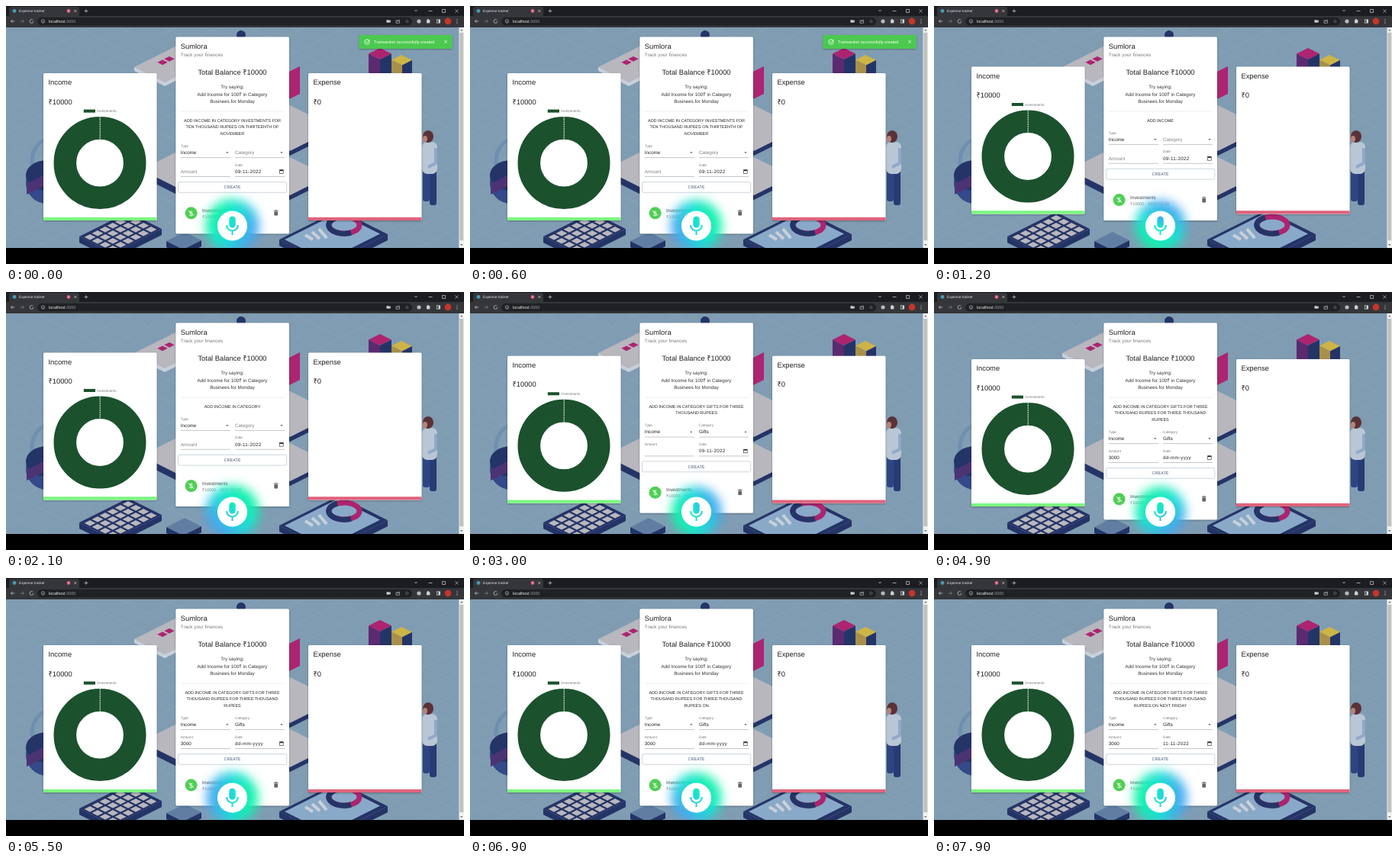
An HTML page for the animation above (8 s loop, 600 by 338 pixels).

```html
<!DOCTYPE html>
<html lang="en">
<head>
<meta charset="utf-8">
<title>Expense tracker</title>
<style>
html, body { margin: 0; width: 100%; height: 100%; overflow: hidden; background: #000; }
svg { display: block; width: 100%; height: 100%; font-family: "Liberation Sans", Arial, sans-serif; text-rendering: geometricPrecision; }
</style>
</head>
<body>
<svg id="stage" viewBox="0 0 600 338" xmlns="http://www.w3.org/2000/svg"></svg>
<script>
const LOOP = 8000;
const SPIN = 1600;
const LINE = 8.6;
const WRAP = 40;
const MIC = { x: 296.5, y: 288 };
const SIZE = { title: 9.375, body: 6.25, small: 5.47, label: 4.69 };

const text = (x, y, size, str, fill = '#222', extra = '') =>
  `<text x="${x}" y="${y}" font-size="${size}" fill="${fill}" ${extra}>${str}</text>`;
const centered = (y, size, str, fill) => text(MIC.x, y, size, str, fill, 'text-anchor="middle"');
const rect = (x, y, w, h, fill, extra = '') =>
  `<rect x="${x}" y="${y}" width="${w}" height="${h}" fill="${fill}" ${extra}/>`;
const oval = (x, y, rx, ry, fill, extra = '') =>
  `<ellipse cx="${x}" cy="${y}" rx="${rx}" ry="${ry}" fill="${fill}" ${extra}/>`;
const disc = (x, y, r, fill, extra) => oval(x, y, r, r, fill, extra);
const line = (d, stroke, w = 0.7, extra = '') =>
  `<path d="${d}" fill="none" stroke="${stroke}" stroke-width="${w}" ${extra}/>`;
const cross = (x, y, r, ink) => line(`M${x - r} ${y - r}l${2 * r} ${2 * r}m0 ${-2 * r}l${-2 * r} ${2 * r}`, ink);
const repeat = (n, make) => Array.from({ length: n }, (_, i) => make(i)).join('');

// Isometric block: top corner, length to the right, length to the left, height.
function block(x, y, a, b, h, top, left = top, right = left) {
  const face = (px, py, dx, dy, ex, ey, fill) =>
    `<path d="M${px} ${py}l${dx} ${dy}l${ex} ${ey}l${-dx} ${-dy}z" fill="${fill}"/>`;
  return face(x, y, a, a / 2, -b, b / 2, top) +
    face(x - b, y + b / 2, a, a / 2, 0, h, left) +
    face(x + a, y + a / 2, -b, b / 2, 0, h, right);
}

const isoKeys = (x, y, cols, rows, step, fill) =>
  repeat(cols * rows, i => {
    const c = i % cols, r = Math.floor(i / cols);
    return block(x + (c - r) * step, y + (c + r) * step / 2, step * 0.74, step * 0.74, 0, fill);
  });

function backdrop() {
  const navy = '#253467', beige = '#b8b7bd', pale = '#c9d0da', pink = '#ad2470', blue = '#89a9c8';
  return rect(0, 27, 600, 290, '#7f9cb2') +
    line(repeat(22, i => `M${i * 56 - 580} 27l580 290m0 -290l-580 290`), '#8aa6ba', 0.5) +
    // pie at the left edge
    oval(58, 204, 24, 30, 'none', 'stroke="#6f8fb0" stroke-width="5"') +
    oval(54, 232, 28, 27, '#34488a') + oval(54, 222, 28, 20, navy) + block(49, 222, 0, 22, 14, '#4c3473') +
    // papers and tablets seen between the cards
    block(228, 50, 40, 60, 5, beige, pale) + isoKeys(214, 66, 1, 2, 9, pink) +
    block(222, 192, 60, 45, 9, beige, navy) +
    block(385, 79, 0, 14, 36, pink) +
    block(372, 130, 60, 60, 6, beige, navy) + block(372, 198, 50, 50, 6, beige, navy) +
    disc(308, 38, 6, navy) +
    // calculator
    block(160, 270, 44, 64, 8, navy) + isoKeys(160, 274, 4, 6, 10, beige) +
    block(234, 296, 22, 24, 8, '#5f7ea2', navy) +
    // phone with a chart
    block(436, 267, 64, 78, 8, navy) + block(435, 271, 55, 70, 0, blue) +
    repeat(3, i => line(`M${392 + i * 9} ${300 - i * 4}l10 ${6 + i * 3}`, pale, 4)) +
    oval(443, 287, 20, 11, 'none', `stroke="${pink}" stroke-width="7"`) +
    line('M452 297A20 11 0 0 1 434 277', navy, 7) +
    // cubes
    block(490, 55, 15, 15, 26, pink, '#5b2a70', navy) +
    block(518, 64, 14, 13, 26, '#cdb446', '#a8904a', navy) +
    // standing man
    rect(546, 208, 9, 48, '#2f4583', 'rx="3"') + rect(555, 210, 9, 51, '#283b73', 'rx="3"') +
    rect(545, 178, 20, 42, '#b9c6d6', 'rx="7"') + line('M563 186v20l-10 5', '#8fa9c9', 4) +
    oval(553, 171, 7, 8, '#5a3238') + oval(549, 174, 3, 4, '#b78577');
}

function browserBar() {
  const ink = '#d0d1d4', dim = '#85878b', y = 20;
  const arrowLeft = (x, dir, color) => line(`M${x + 2.5 * dir} ${y}h${-5 * dir}m${2.2 * dir} -2.2l${-2.2 * dir} 2.2l${2.2 * dir} 2.2`, color);
  return rect(0, 0, 600, 13, '#1c1d20') +
    rect(4, 1, 92, 14, '#35363a', 'rx="3"') +
    rect(0, 13, 600, 15, '#35363a') + rect(41, 15, 491, 10.5, '#202124', 'rx="5.2"') +
    disc(11, 6.5, 2.4, '#4a9bb5') + text(17, 8.3, SIZE.label, 'Expense tracker', '#e2e3e5') +
    disc(82, 6.5, 2.4, '#d2577c') + disc(82, 6.5, 1.2, '#f08aa8') +
    cross(90.8, 6.5, 1.5, ink) + line('M102.5 6.5h5m-2.5 -2.5v5', ink) +
    line('M535 5l2 2l2 -2m14.5 1.5h5m13 -2h4v4h-4z', ink) + cross(590.5, 6.5, 2, ink) +
    arrowLeft(9, 1, ink) + arrowLeft(21, -1, dim) +
    disc(33.5, y, 2.4, 'none', `stroke="${ink}" stroke-width=".7" stroke-dasharray="12 3"`) +
    disc(48.5, y, 2.2, 'none', `stroke="${ink}" stroke-width=".6"`) + line('M48.5 19.7v1.5', ink) +
    text(56, 22, SIZE.small, 'localhost<tspan fill="#9a9da1">:3000</tspan>', '#eeeff1') +
    rect(498.5, 18.3, 3.8, 3.4, ink) + block(504, 18.5, 0, 1.6, 2.4, ink) +
    rect(511, 19, 4.4, 3.2, 'none', `stroke="${ink}" stroke-width=".6"`) + line('M512.5 20.5l3 -2.5', ink) +
    text(525.5, 22.2, 6.5, '☆', ink, 'text-anchor="middle"') +
    disc(541, y, 2.6, '#b7babf') + rect(551, 18.2, 4.4, 4.2, ink) + disc(553, 18, 1.1, ink) +
    rect(564, 17.5, 5, 5, ink) + rect(564.7, 18.3, 1.8, 3.5, '#35363a') +
    disc(579, y, 4.4, '#c5352c') +
    repeat(3, i => disc(591, 17.8 + i * 2.2, 0.6, ink));
}

const scrollbar = () => rect(593.5, 28, 6.5, 289, '#f1f1f1') + rect(594.3, 35, 4.9, 272, '#c1c1c1') +
  arrow(596.8, 31.5, -1) + arrow(596.8, 313, 1);

const shadowed = 'rx="1.6" filter="url(#shadow)"';
const card = (x, y, h, id = '') => rect(x, y, 148.5, h, '#fff', `${shadowed} ${id}`);

const sideCard = (x, title, total, strip) =>
  card(x, 79.4, 193) + rect(x, 268.2, 148.5, 4.2, strip) +
  text(x + 6.4, 94.8, SIZE.title, title) + text(x + 6.4, 120, SIZE.title, total);

const donut = () =>
  rect(101.8, 127, 15.2, 4, '#1b512d') + text(119.3, 130.8, SIZE.label, 'Investments', '#777') +
  disc(123, 197, 45.7, 'none', 'stroke="#1b512d" stroke-width="29.6"') +
  line('M123.2 136.5V166.2', '#fff', 0.9, 'stroke-dasharray="2.2 .7"');

const arrow = (x, y, dir = 1) => line(`M${x - 1} ${y - dir * 0.5}h2l-1 ${dir}z`, '#666', 1);
const LEFT = 228.8, RIGHT = 300, TOP_ROW = 176.9, LOW_ROW = 201.8;

const form = () =>
  [LEFT, RIGHT].map(x => arrow(x + 61, 175) +
    [TOP_ROW, LOW_ROW].map(y => line(`M${x} ${y + 4.5}h65`, '#8d8d8d', 0.5)).join('')).join('') +
  '<g id="fields"></g>' +
  rect(358.6, 197.6, 4.6, 4.6, 'none', 'stroke="#222" stroke-width=".6"') + rect(358.6, 197.4, 4.6, 1.5, '#222') +
  rect(225.5, 213.3, 142.2, 13.8, '#fff', 'rx="1.5" stroke="#aebdca" stroke-width=".6"') +
  centered(222.2, SIZE.small, 'CREATE', '#42566e') +
  disc(242.6, 254.1, 8, '#50ce55') + text(242.6, 257.4, 9, '$', '#fff', 'text-anchor="middle"') +
  line('M239 250.6l7 7', '#fff', 0.8) +
  text(257, 252.6, SIZE.body, 'Investments', '#424242') +
  text(257, 260.6, SIZE.small, '₹10000 - 2022-11-13', '#858585') +
  rect(351.3, 252, 4.8, 5.4, '#666', 'rx=".8"') + rect(350.8, 250.5, 5.9, 0.9, '#666') + rect(352.6, 249.9, 2.3, 1, '#666');

const toast = () =>
  rect(462.5, 38, 122, 18, '#4bc950', shadowed) +
  disc(473, 47, 3.2, 'none', 'stroke="#fff" stroke-width=".8"') + line('M471.3 46.6l1.5 1.5l3.5 -3.6', '#fff', 0.8) +
  text(482, 49, SIZE.small, 'Transaction successfully created', '#fff') + cross(576, 46.8, 1.8, '#fff');

const mic = () =>
  `<g clip-path="url(#page)">${disc(MIC.x, MIC.y, 34, 'url(#halo)', 'id="glow" filter="url(#blur)"')}</g>` +
  disc(MIC.x, MIC.y, 19.6, '#fff') +
  rect(MIC.x - 4.2, 275.5, 8.4, 15, 'url(#icon)', 'rx="4.2"') +
  line('M289 287a7.5 7.5 0 0 0 15 0m-7.5 7.5v5.6', 'url(#icon)', 2);

const gradient = (id, reach) =>
  `<linearGradient id="${id}" gradientUnits="userSpaceOnUse" x1="${MIC.x - reach}" y1="${MIC.y}" x2="${MIC.x + reach}" y2="${MIC.y}">
    <stop stop-color="#10f5a5"/><stop offset=".5" stop-color="#1adfd8"/><stop offset="1" stop-color="#48a2f2"/></linearGradient>`;

document.getElementById('stage').innerHTML = `<defs>
  <filter id="shadow" x="-10%" y="-10%" width="120%" height="120%"><feDropShadow dx="0" dy=".8" stdDeviation="1" flood-opacity=".35"/></filter>
  <filter id="blur" x="-60%" y="-60%" width="220%" height="220%" color-interpolation-filters="sRGB"><feGaussianBlur stdDeviation="7"/></filter>
  <clipPath id="page"><rect y="28" width="594" height="289"/></clipPath>
  ${gradient('halo', 30)}${gradient('icon', 14)}</defs>` +
  rect(0, 0, 600, 338, '#000') + browserBar() + `<g clip-path="url(#page)">${backdrop()}</g>` + scrollbar() +
  `<g id="sides">${sideCard(49, 'Income', '₹10000', '#7cf780')}${donut()}${sideCard(396, 'Expense', '₹0', '#df637c')}</g>` +
  card(222.4, 40.4, 240.6, 'id="panel"') +
  text(LEFT, 55.6, SIZE.title, 'Sumlora') +
  text(LEFT, 66, SIZE.body, 'Track your finances', '#777', 'letter-spacing=".06"') +
  centered(90.4, SIZE.title, 'Total Balance ₹10000') +
  ['Try saying:', 'Add Income for 100₹ in Category', 'Businees for Monday']
    .map((s, i) => centered(108.2 + i * 9.4, SIZE.body, s, '#333')).join('') +
  line('M228.8 138.2H365', '#ddd', 0.5) +
  `<g id="speech"></g><g id="form">${form()}</g><g id="toast">${toast()}</g>` + mic();

const [sides, panel, speech, formGroup, fields, toastGroup, glow, halo, icon] =
  ['sides', 'panel', 'speech', 'form', 'fields', 'toast', 'glow', 'halo', 'icon'].map(id => document.getElementById(id));

// Each step adds to the one before; "said" restarts the sentence, "more" continues it.
const steps = [
  { at: 0, said: 'ADD INCOME IN CATEGORY INVESTMENTS FOR TEN THOUSAND RUPEES ON THIRTEENTH OF NOVEMBER', date: '09-11-2022' },
  { at: 900, said: 'ADD INCOME' },
  { at: 1900, more: ' IN CATEGORY' },
  { at: 2200, more: ' GIFTS', category: 'Gifts' },
  { at: 2600, more: ' FOR THREE THOUSAND RUPEES', amount: '' },
  { at: 4900, more: ' FOR THREE THOUSAND RUPEES', amount: '3000', date: 'dd-mm-yyyy' },
  { at: 6500, more: ' ON' },
  { at: 7400, more: ' NEXT FRIDAY', date: '11-11-2022' },
];
steps.forEach((step, i) => {
  const before = steps[i - 1];
  steps[i] = { ...before, said: before?.said + step.more, ...step };
});

function wrap(sentence) {
  const lines = [''];
  for (const word of sentence.split(' ')) {
    const joined = `${lines.at(-1)} ${word}`.trim();
    if (joined.length > WRAP) lines.push(word);
    else lines[lines.length - 1] = joined;
  }
  return lines;
}

// Without a value the label serves as placeholder.
const field = (x, y, label, value, extra) => value === undefined
  ? text(x, y, SIZE.body, label, '#808080')
  : text(x, y - 9.4, SIZE.label, label, '#777') + text(x, y, SIZE.body, value, '#222', extra);

let shown;
function showStep(step) {
  if (step === shown) return;
  shown = step;
  const lines = wrap(step.said);
  const grow = (lines.length - 1) * LINE;
  speech.innerHTML = lines.map((s, i) => centered(151.5 + i * LINE, SIZE.small, s)).join('');
  fields.innerHTML = field(LEFT, TOP_ROW, 'Type', 'Income') + field(RIGHT, TOP_ROW, 'Category', step.category) +
    field(LEFT, LOW_ROW, 'Amount', step.amount) + field(RIGHT, LOW_ROW, 'Date', step.date, 'letter-spacing=".3"');
  panel.setAttribute('height', 240.6 + grow);
  formGroup.setAttribute('transform', `translate(0 ${grow})`);
  sides.setAttribute('transform', `translate(0 ${grow / 2})`);
}

function render(t) {
  showStep(steps.findLast(s => s.at <= t));
  toastGroup.setAttribute('opacity', Math.max(0, Math.min(1, (900 - t) / 200)));
  const turn = `rotate(${t / SPIN * 360 + 25} ${MIC.x} ${MIC.y})`;
  for (const g of [halo, icon]) g.setAttribute('gradientTransform', turn);
  const r = 34 + Math.cos(t / 1000 * Math.PI);
  glow.setAttribute('rx', r);
  glow.setAttribute('ry', r);
}

const start = performance.now();
function tick() {
  render((performance.now() - start) % LOOP);
  requestAnimationFrame(tick);
}
tick();
</script>
</body>
</html>
```
